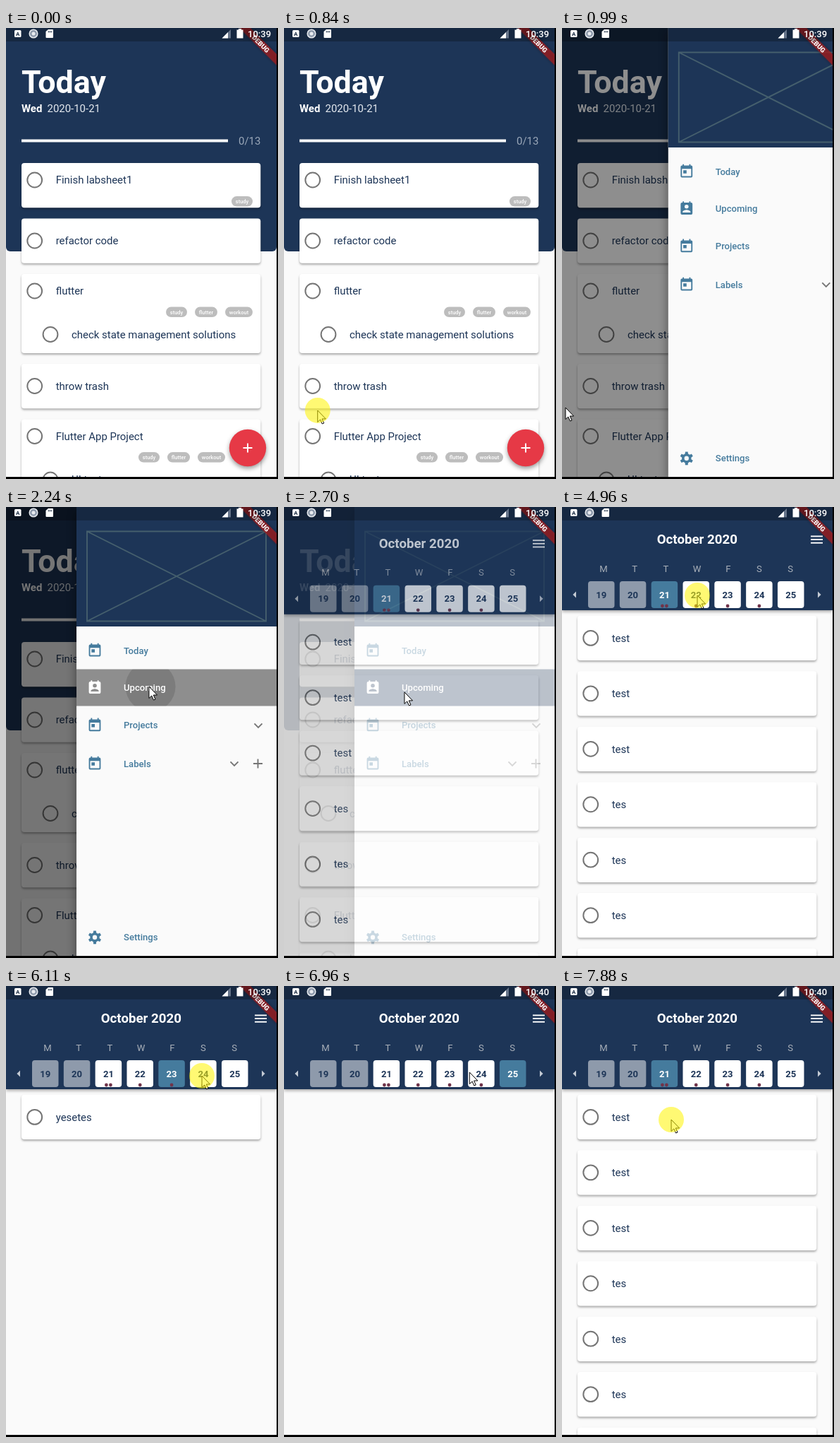
Recreate the animation shown at these times as an HTML page. Size 386x638 px, loop 8 s.

```html
<!DOCTYPE html>
<html lang="en">
<head>
<meta charset="utf-8">
<title>Todo app</title>
<style>
html, body { margin: 0; width: 100%; height: 100%; overflow: hidden; background: #000; }
svg { display: block; font-family: Roboto, "Noto Sans", sans-serif; font-size: 14.95px; }
text { white-space: pre; }
.mid { text-anchor: middle; }
.card { fill: #fff; filter: drop-shadow(0 2px 1.5px rgba(0, 0, 0, .32)); }
.ring { fill: none; stroke: #757575; stroke-width: 2; }
.ink { fill: #1d3557; }
.pill { font-size: 7.5px; font-weight: 500; fill: #fff; }
.nav { font-size: 13.08px; font-weight: 500; }
.line { fill: none; stroke: #757575; stroke-width: 1.9; }
.num { font-size: 13.08px; font-weight: 700; text-anchor: middle; }
</style>
</head>
<body>
<svg id="stage" width="386" height="638" viewBox="0 0 386 638"></svg>
<script>
const LOOP = 8000, NAVY = '#1d3557', BLUE = '#457b9d', RED = '#e63946';
const PITCH = 44.83, WEEK = PITCH * 7;

const rect = (x, y, w, h, fill, more = '') =>
  `<rect x="${x}" y="${y}" width="${w}" height="${h}" fill="${fill}" ${more}/>`;
const text = (x, y, s, more = 'class="ink"') => `<text x="${x}" y="${y}" ${more}>${s}</text>`;
const card = (y, h = 63.3) => `<rect class="card" x="22" y="${y}" width="339.3" height="${h}" rx="4"/>`;
const task = (x, y, s) =>
  `<circle class="ring" cx="${x}" cy="${y}" r="10.4"/>` + text(x + 30, y + 5.3, s);
const pill = (x, y, w, s) =>
  rect(x, y, w, 14.6, '#bdbdbd', 'rx="7.3"') + text(x + w / 2, y + 10, s, 'class="pill mid"');

// Today page
function todayPage() {
  const tags = (xs, y) => pill(xs, y, 30, 'study') + pill(xs + 41, y, 32, 'flutter') + pill(xs + 84, y, 39, 'workout');
  return rect(0, 0, 384, 635, '#fafafa') + rect(0, -10, 384, 326, NAVY, 'rx="6"') +
    text(22, 92, 'Today', 'fill="#fff" font-size="44.8" font-weight="700"') +
    text(22, 119, 'Wed', 'fill="#fff" font-weight="700"') +
    text(58.5, 119, '2020-10-21', 'fill="#e3e8ee"') +
    rect(22, 157.5, 293, 4, '#fafafa') + text(330, 165, '0/13', 'fill="#9ba8b9"') +
    card(191) + task(40.7, 215, 'Finish labsheet1') + pill(320, 238, 30, 'study') +
    card(269.5) + task(40.7, 301, 'refactor code') +
    card(348, 112) + task(40.7, 372, 'flutter') + tags(227, 394.5) +
    task(63, 433.5, 'check state management solutions') +
    card(475) + task(40.7, 506.5, 'throw trash') +
    card(553.5, 112) + task(40.7, 577.5, 'Flutter App Project') + tags(188, 600) +
    task(63, 639, 'UI tests') +
    `<circle cx="343" cy="594" r="26.2" fill="${RED}" style="filter:drop-shadow(0 3px 3px rgba(0,0,0,.4))"/>
     <path d="M336.5 594h13M343 587.5v13" stroke="#fff" stroke-width="1.9"/>`;
}

// Drawer
const CAL = 'M19 3h-1V1h-2v2H8V1H6v2H5a2 2 0 0 0-2 2v14a2 2 0 0 0 2 2h14a2 2 0 0 0 2-2V5a2 2 0 0 0-2-2z';
const DAY = CAL + 'm0 16H5V8h14zM7 10h5v5H7z';
const PERSON = CAL + 'm-7 3a3 3 0 1 1 0 6a3 3 0 1 1 0-6zm6 12H6v-1c0-2 4-3.1 6-3.1s6 1.1 6 3.1z';
const icon = (x, y, body) => `<g transform="translate(${x} ${y}) scale(.934) translate(-12 -12)">${body}</g>`;
const glyph = d => `<path fill-rule="evenodd" d="${d}"/>`;
const gear = () => '<circle cx="12" cy="12" r="5.3" fill="none" stroke="currentColor" stroke-width="3.8"/>' +
  [0, 60, 120, 180, 240, 300].map(a =>
    `<path d="M9.6 6L10 2h4l.4 4z" transform="rotate(${a} 12 12)"/>`).join('');
const chevron = (x, y) => `<path class="line" d="M${x - 5.5} ${y - 2.7}l5.5 5.5l5.5-5.5"/>`;

function drawer() {
  const row = (y, s, pic, id = '') =>
    `<g ${id} fill="${BLUE}" color="${BLUE}">${icon(126, y, pic)}${text(167, y + 4.6, s, 'class="nav"')}</g>`;
  return rect(100, 0, 300, 635, '#fafafa', 'style="filter:drop-shadow(0 6px 7px rgba(0,0,0,.45))"') +
    rect(100, 0, 300, 169, NAVY) +
    '<path d="M115 34.5H369V161.5H115ZL369 161.5M369 34.5L115 161.5" fill="none" stroke="#455f6d" stroke-width="1.9"/>' +
    rect(100, 229.5, 284, 52, '#8e8e8e', 'id="hot"') +
    '<clipPath id="rowClip"><rect x="100" y="229.5" width="284" height="52"/></clipPath>' +
    '<g clip-path="url(#rowClip)"><circle id="ripple" cx="205" cy="254" r="0" fill="#000" fill-opacity=".13"/></g>' +
    row(203, 'Today', glyph(DAY)) + row(255.5, 'Upcoming', glyph(PERSON), 'id="up"') +
    row(308.8, 'Projects', glyph(DAY)) + row(363, 'Labels', glyph(DAY)) +
    row(608.8, 'Settings', gear()) +
    chevron(358, 309) + chevron(324, 363) + '<path class="line" d="M351 363h13M357.5 356.5v13"/>';
}

// Upcoming page
const LISTS = {
  21: ['test', 'test', 'test', 'tes', 'tes', 'tes', 'tes'],
  22: ['test', 'test'], 23: ['yesetes'], 24: ['test'], 25: []
};
const DOTS = { 21: [-3, 3], 22: [0], 23: [0], 24: [0] };

function dayTile(i) {
  const day = (18 + i) % 31 + 1, x = 37 + PITCH * i, c = x + 18.75;
  const dots = (DOTS[day] || []).map(d => `<circle class="dot" cx="${c + d}" cy="140" r="2.4"/>`).join('');
  return `<g class="day" data-day="${day}">${rect(x, 105, 37.5, 38, '#fff', `rx="4" opacity="${i < 2 ? .5 : 1}"`)}` +
    text(c, 128.7, day, 'class="num"') + dots + '</g>';
}

function upcomingPage() {
  const list = day => `<g class="list" data-day="${day}">` +
    LISTS[day].map((s, i) => card(153.8 + i * 78.45) + task(40.7, 185.4 + i * 78.45, s)).join('') + '</g>';
  return rect(0, 0, 384, 640, '#fafafa') + Object.keys(LISTS).map(list).join('') +
    rect(0, -20, 384, 166, NAVY, 'style="filter:drop-shadow(0 2px 2px rgba(0,0,0,.35))"') +
    text(191.8, 52, 'October 2020', 'class="mid" fill="#fff" font-size="18.68" font-weight="700"') +
    [40.5, 45.1, 49.8].map(y => rect(353, y, 17, 1.9, '#fff')).join('') +
    [...'MTTWFSS'].map((s, i) => text(59 + i * 44.2, 91.5, s, 'class="mid" font-size="13.08" fill="#a9b0b9"')).join('') +
    '<path d="M20 119.5v9l-4.6-4.5zM363 119.5v9l4.6-4.5z" fill="#c3cad3"/>' +
    '<clipPath id="weekClip"><rect x="37" y="100" width="310" height="46"/></clipPath>' +
    '<g clip-path="url(#weekClip)"><g id="week">' +
    Array.from({ length: 14 }, (_, i) => dayTile(i)).join('') + '</g></g>';
}

function statusBar() {
  return `<g transform="translate(384 0) rotate(45)">${rect(-37.4, 26.1, 74.8, 11.2, '#b71c1c', 'fill-opacity=".68" style="filter:drop-shadow(0 0 2px rgba(0,0,0,.5))"')}` +
    text(0, 35.1, 'DEBUG', 'class="mid" fill="#fff" font-size="9.5" font-weight="900"') + '</g>' +
    rect(0, 0, 384, 19, '#000', 'fill-opacity=".25"') +
    rect(12, 3, 9.5, 10, '#fff', 'rx="1.5"') +
    text(16.8, 11, 'A', 'class="mid" font-size="8" font-weight="700" fill="#16283f"') +
    '<circle cx="39" cy="8" r="5.8" fill="#8e9aab" stroke="#e8ebef" stroke-width="1.5"/><circle cx="39" cy="8" r="2.5" fill="#e8ebef"/>' +
    '<path d="M60 2h6q1 0 1 1v10q0 1-1 1h-8.500q-1 0-1-1V5z" fill="#fff"/><path d="M60.300 4v2.500M62.500 4v2.500M64.700 4v2.500" stroke="#16283f"/>' +
    '<path d="M306.500 14.500L319 2v12.500z" fill="#66748a"/><path d="M306.500 14.500L315 6v8.500z" fill="#fff"/>' +
    '<path d="M330 1h4v1.500h2.500V14.500h-9V2.500H330z" fill="#fff"/>' +
    text(343, 13, '10:39', 'id="clock" fill="#fff" font-size="13.08" font-weight="500"');
}

const $ = id => document.getElementById(id);
$('stage').innerHTML =
  '<clipPath id="screen"><rect width="384" height="635"/></clipPath><g clip-path="url(#screen)">' +
  `<g id="base">${todayPage()}${rect(0, 0, 384, 635, '#000', 'id="scrim"')}<g id="drawer">${drawer()}</g></g>` +
  `<g id="next">${upcomingPage()}</g>${statusBar()}</g>` +
  '<path id="cursor" d="M0 0V16.500L3.800 13L6.500 19L9 18L6.300 12H11.600Z" fill="#fff" stroke="#000"/>' +
  '<circle id="press" r="18" fill="#fff400" fill-opacity=".55"/>';

// Timing tables
const PATH = [
  [0, 400, 560], [100, 400, 560], [400, 377, 552], [620, 372, 548], [840, 48, 541], [990, 5, 537],
  [1150, 5, 537], [1680, 206, 254], [2150, 206, 254], [2240, 203, 254], [2700, 171, 262],
  [2930, 158, 239], [3620, 210, 119], [3790, 210, 119], [3940, 191, 122], [4060, 191, 122],
  [4340, 150, 124], [4500, 205, 124], [4800, 192, 125], [5200, 192, 125], [5560, 234, 125],
  [5780, 234, 125], [6030, 278, 127], [6240, 278, 127], [6600, 322, 120], [6800, 322, 120],
  [7280, 147, 126], [7460, 147, 126], [7730, 155, 189], [8000, 155, 189]
];
const PRESSES = [[620, 900], [2000, 2150], [3620, 3930], [4360, 4480], [4960, 5080],
  [5640, 5740], [6080, 6200], [6640, 6760], [7340, 7440], [7880, 8000]];
const PICKS = [[0, 21], [5040, 22], [5720, 23], [6200, 24], [6750, 25], [7420, 21]];

const ramp = (t, start, len) => Math.min(1, Math.max(0, (t - start) / len));
const easeOut = p => 1 - (1 - p) ** 3;
const inOut = p => p < .5 ? 4 * p ** 3 : 1 - 4 * (1 - p) ** 3;
const show = (el, on) => { el.style.display = on ? '' : 'none'; };
const days = [...document.querySelectorAll('.day')];
const lists = [...document.querySelectorAll('.list')];
const dots = [...document.querySelectorAll('.dot')];

function cursorAt(t) {
  const i = Math.max(1, PATH.findIndex(k => k[0] > t));
  const [t0, x0, y0] = PATH[i - 1], [t1, x1, y1] = PATH[i];
  const p = (t - t0) / (t1 - t0);
  return [x0 + (x1 - x0) * p, y0 + (y1 - y0) * p];
}

function draw(t) {
  const open = easeOut(ramp(t, 860, 300));
  $('scrim').setAttribute('fill-opacity', .54 * open);
  $('drawer').setAttribute('transform', `translate(${284 * (1 - open)} 0)`);
  show($('drawer'), open > 0);

  const hot = t >= 2150;
  show($('hot'), hot);
  $('hot').setAttribute('fill', t < 2380 ? '#8e8e8e' : NAVY);
  $('up').setAttribute('fill', hot ? '#fff' : BLUE);
  $('ripple').setAttribute('r', hot ? 35 + Math.max(0, t - 2240) * .5 : 0);
  $('ripple').setAttribute('opacity', 1 - ramp(t, 2300, 250));

  const turn = ramp(t, 2460, 305);
  show($('base'), turn < 1);
  show($('next'), turn > 0);
  $('next').setAttribute('opacity', turn ** 1.45);
  $('next').setAttribute('transform', `translate(0 ${154 * (1 - turn) ** 2.1})`);

  const shift = WEEK * (inOut(ramp(t, 3950, 380)) - inOut(ramp(t, 4400, 390)));
  $('week').setAttribute('transform', `translate(${-shift} 0)`);
  const picked = PICKS.filter(k => k[0] <= t).pop()[1];
  for (const g of days) {
    const on = +g.dataset.day === picked;
    g.children[0].setAttribute('fill', on ? BLUE : '#fff');
    g.children[1].setAttribute('fill', on ? '#fff' : NAVY);
  }
  for (const g of lists) show(g, +g.dataset.day === picked);
  const dotFill = t > 3790 && t < 4960 ? RED : '#70344a';
  for (const d of dots) d.setAttribute('fill', dotFill);

  $('clock').textContent = t < 6200 ? '10:39' : '10:40';
  const at = `translate(${cursorAt(t).join(' ')})`;
  $('cursor').setAttribute('transform', at);
  $('press').setAttribute('transform', at);
  show($('press'), PRESSES.some(([a, b]) => t >= a && t < b));
}

const begin = performance.now();
function tick() {
  draw((performance.now() - begin) % LOOP);
  requestAnimationFrame(tick);
}
tick();
</script>
</body>
</html>
```
